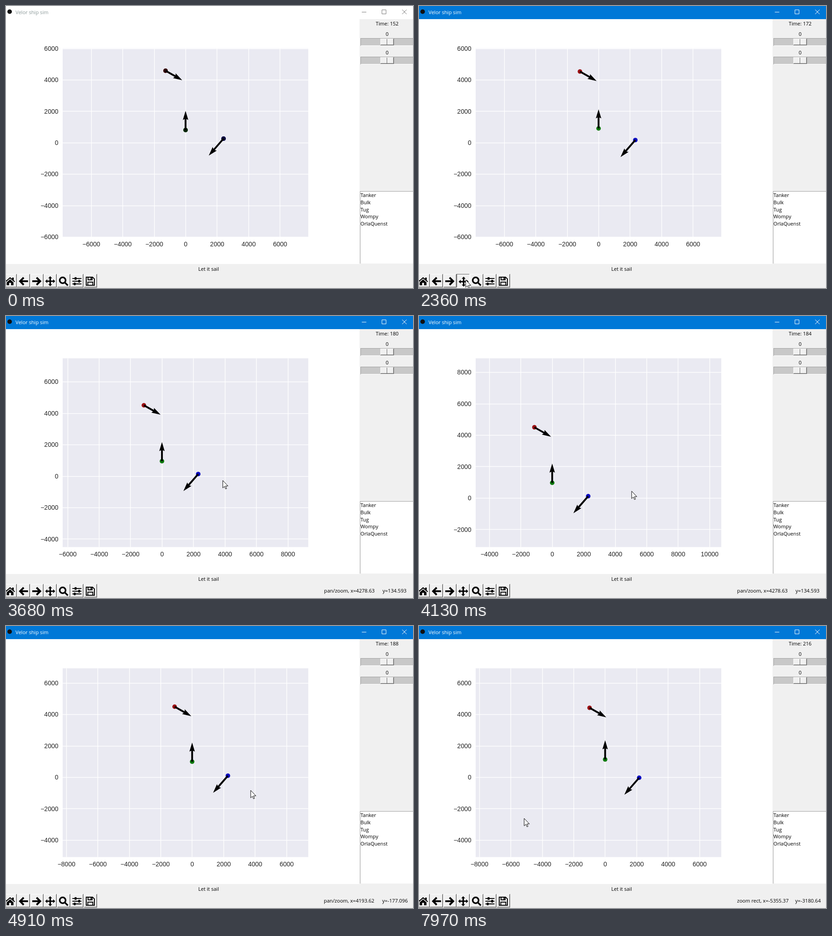
Animation of 898 by 623 pixels, one loop 8000 ms. Source, as an HTML page with a canvas:

```html
<!DOCTYPE html>
<html lang="en">
<head>
<meta charset="utf-8">
<title>Ship sim</title>
<style>
html, body { margin: 0; width: 100%; height: 100%; overflow: hidden; background: #f0f0f0; }
canvas { display: block; }
</style>
</head>
<body>
<canvas id="stage" width="898" height="623"></canvas>
<script>
const c = document.getElementById('stage').getContext('2d');
const LOOP = 8000;
const SCALE = 0.03471; // pixels per metre
const HOME = { x: 396.5, y: 302.3 }; // plot origin before panning
const AXES = { left: 125, top: 93.5, right: 667, bottom: 510.5 };
const UI_FONT = '11.1px "Open Sans", "Noto Sans", sans-serif';
const TICK_FONT = '14px "Liberation Sans", Arial, sans-serif';

const ACTIVATE = 2360, GRAB = 3260, DROP = 4620, ZOOM = 7480, CLICK = 75;
const LAG = 130; // the plot follows the pointer late

// Turning points of the pointer: [time, x, y]
const POINTER = [
  [580, 128, 623], [1340, 103, 605], [2600, 103, 605], [GRAB, 545, 295.6],
  [3390, 511, 332], [4000, 442.5, 397.8], [4130, 469, 387], [DROP, 559.5, 329.8],
  [4910, 540, 363], [5320, 505, 402], [6070, 505, 402], [6460, 166, 606],
  [6700, 148, 602], [7080, 126, 603], [7790, 126, 603], [7970, 232, 425]
];

// Toolbar message: [start, mode, x, y]
const GRABBED = { x: 4278.63, y: 134.593 };
const STATUS = [
  [0, ''], [ACTIVATE + CLICK, 'pan/zoom'],
  [3040, 'pan/zoom', GRABBED.x, GRABBED.y], [4780, 'pan/zoom', 4193.62, -177.096],
  [6200, 'pan/zoom', -595.041, -3719.01],
  [ZOOM, 'zoom rect'], [7900, 'zoom rect', -5355.37, -3180.64]
];

// Metres, metres per time unit, degrees
const START = 152;
const SHIPS = [
  { x: -1282, y: 4590, speed: 5.1, course: -29.6, color: '#9c1014' },
  { x: -9, y: 815, speed: 5.1, course: 90, color: '#0f7a0f' },
  { x: 2406, y: 268, speed: 6, course: -131, color: '#0808c0' }
];

const MOVE = new Path2D('M-11 0-6.5-4.3V-1.6H-1.6V-6.5H-4.3L0-11 4.3-6.5H1.6V-1.6H6.5V-4.3L11 0 6.5 4.3V1.6H1.6V6.5H4.3L0 11-4.3 6.5H-1.6V1.6H-6.5V4.3Z');
const ARROW = new Path2D('M0 0V16.5L3.8 13 6.2 18.7 8.6 17.7 6.2 12.2H11.5Z');

// Toolbar icons: path, stroke width (0 = fill), tooltip
const ICONS = [
  [new Path2D('M-11 0.5 0-9 4.5-5.2V-8H8V-2L11 .5 9.6 2 0-6-9.6 2ZM-7.5 2.5 0-4 7.5 2.5V9H2.2V3.5H-2.2V9H-7.5Z'), 0],
  [new Path2D('M10 0H-6M.5-8-7.5 0 .5 8'), 4],
  [new Path2D('M-10 0H6M-.5-8 7.5 0-.5 8'), 4],
  [MOVE, 0],
  [new Path2D('M4.5-2A6.5 6.5 0 1 1-8.5-2 6.5 6.5 0 1 1 4.5-2M3 3 9.5 9.5'), 3.5, 'Zoom to rectangle'],
  [new Path2D('M-10-7H10V-5H-10ZM-10-1H10V1H-10ZM-10 5H10V7H-10ZM-5-9H-1V-3H-5ZM3-3H7V3H3ZM-7 3H-3V9H-7Z'), 0, 'Configure subplots'],
  [new Path2D('M-9-9H5L9-5V9H-9ZM-5-9V-3H4V-9M1.5-8V-4M-5.5 9V2H5.5V9'), 2]
];
const BUTTON = 29.5;
const buttonLeft = i => Math.round(i * BUTTON - 5.5);

function pointerAt(t) {
  const next = POINTER.findIndex(k => k[0] > t);
  const b = POINTER.at(next), a = POINTER[Math.max(0, next < 0 ? POINTER.length - 1 : next - 1)];
  const p = a === b ? 0 : (t - a[0]) / (b[0] - a[0]);
  return { x: a[1] + (b[1] - a[1]) * p, y: a[2] + (b[2] - a[2]) * p };
}

// The grabbed point stays under the delayed pointer
function originAt(t) {
  if (t - LAG < GRAB) return HOME;
  const p = pointerAt(Math.min(t - LAG, DROP));
  return { x: p.x - GRABBED.x * SCALE, y: p.y + GRABBED.y * SCALE };
}

// Panning slows the simulation down
function ageAt(t) {
  const panning = Math.min(Math.max(t - GRAB, 0), DROP - GRAB);
  return 4 * Math.max(0, Math.floor((t - 0.2 * panning + 134) / 484));
}

function rect(x, y, w, h, color) {
  c.fillStyle = color;
  c.fillRect(x, y, w, h);
}

function text(str, x, y, align = 'left', color = '#000') {
  c.fillStyle = color;
  c.textAlign = align;
  c.fillText(str, x, y);
}

function disc(x, y, r, color) {
  c.fillStyle = color;
  c.beginPath();
  c.arc(x, y, r, 0, 7);
  c.fill();
}

function shape(path, x, y, fill, stroke, width = 1) {
  c.save();
  c.translate(x, y);
  if (fill) { c.fillStyle = fill; c.fill(path); }
  if (stroke) { c.strokeStyle = stroke; c.lineWidth = width; c.stroke(path); }
  c.restore();
}

function bevel(x, y, w, h, sunken) {
  const [light, dark] = sunken ? ['#696969', '#fff'] : ['#fff', '#696969'];
  rect(x, y, w, h, dark);
  rect(x, y, w - 1, h - 1, light);
  rect(x + 1, y + 1, w - 2, h - 2, sunken ? '#f0f0f0' : '#a0a0a0');
  rect(x + 1, y + 1, w - 3, h - 3, '#f0f0f0');
}

function titleBar(active) {
  rect(0, 0, 898, 29, active ? '#0078d7' : '#fff');
  disc(8, 12.5, 5, '#111');
  text('Velor ship sim', 21, 18, 'left', active ? '#fff' : '#8b9999');
  shape(new Path2D('M785 13.5H795M829.5 8.5H838.5V17.5H829.5ZM874 8 884 18M884 8 874 18'), 0, 0, null, active ? '#fff' : '#777');
}

function grid(origin) {
  const w = AXES.right - AXES.left, h = AXES.bottom - AXES.top;
  rect(0, 28, 780, 542, '#fff');
  rect(AXES.left, AXES.top, w, h, '#eaeaf2');
  c.font = TICK_FONT;
  for (let v = -10000; v <= 12000; v += 2000) {
    const x = origin.x + v * SCALE, y = origin.y - v * SCALE;
    const label = String(v).replace('-', '\u2212');
    if (x > AXES.left && x < AXES.right) {
      rect(Math.floor(x) - 0.2, AXES.top, 1.4, h, '#fff');
      text(label, x, 530.5, 'center', '#262626');
    }
    if (y > AXES.top - 0.5 && y < AXES.bottom + 0.5) {
      rect(AXES.left, Math.floor(y) - 0.2, w, 1.4, '#fff');
      text(label, 115.5, Math.round(y + 4.7), 'right', '#262626');
    }
  }
}

function ship(s, origin, age, active) {
  const angle = s.course * Math.PI / 180;
  const x = origin.x + (s.x + s.speed * age * Math.cos(angle)) * SCALE;
  const y = origin.y - (s.y + s.speed * age * Math.sin(angle)) * SCALE;
  const tip = s.speed * 8.3;
  disc(x, y, 5, s.color);
  if (!active) disc(x, y, 5, 'rgba(0,0,0,.7)');
  c.save();
  c.translate(x, y);
  c.rotate(-angle);
  const arrow = new Path2D(`M0-2H${tip - 18}L${tip - 20}-6 ${tip} 0 ${tip - 20} 6 ${tip - 18} 2H0Z`);
  shape(arrow, 0, 0, '#000');
  c.restore();
}

function slider(y) {
  text('0', 841, y - 5, 'center');
  rect(782, y, 116, 17, '#a0a0a0');
  rect(783, y + 1, 115, 16, '#fff');
  rect(783, y + 1, 115, 15, '#c8c8c8');
  bevel(826, y + 1, 30, 15);
  rect(840, y + 2, 1, 13, '#696969');
}

function sidePanel(clock) {
  text('Time: ' + clock, 841, 43, 'center');
  slider(71);
  slider(112);
  rect(781, 409, 117, 160, '#a0a0a0');
  rect(782, 410, 116, 159, '#fff');
  ['Tanker', 'Bulk', 'Tug', 'Wompy', 'OrlaQuenst'].forEach((name, i) => text(name, 782, 422 + i * 15.75));
}

function toolbar(t) {
  const during = start => t >= start && t < start + CLICK;
  const pressed = during(ACTIVATE) ? 3 : during(ZOOM) ? 4 : -1;
  text('Let it sail', 447, 584.5, 'center');
  ICONS.forEach(([path, width], i) => {
    const sunken = i === pressed, shift = sunken ? 1 : 0;
    bevel(buttonLeft(i), 592, 29, 30, sunken);
    shape(path, 9 + i * BUTTON + shift, 608 + shift, !width && '#000', width && '#000', width);
  });
  const [, mode, x, y] = STATUS.findLast(s => s[0] <= t);
  const pad = v => v.toPrecision(6).padEnd(12);
  text(x === undefined ? mode : `${mode}, x=${pad(x)} y=${pad(y)}`, 898, 611, 'right');
}

function tooltip(p) {
  const i = Math.floor((p.x + 5.5) / BUTTON);
  const label = p.y > 592 && ICONS[i]?.[2];
  if (!label) return;
  const x = buttonLeft(i) + 27, w = Math.round(c.measureText(label).width) + 6;
  rect(x, 593, w, 18, '#000');
  rect(x + 1, 594, w - 2, 16, '#ffffe0');
  text(label, x + 3, 606);
}

function draw() {
  const t = performance.now() % LOOP;
  const active = t >= ACTIVATE;
  const origin = originAt(t), age = ageAt(t), p = pointerAt(t);
  rect(0, 0, 898, 623, '#f0f0f0');
  grid(origin);
  SHIPS.forEach(s => ship(s, origin, age, active));
  c.font = UI_FONT;
  titleBar(active);
  sidePanel(START + age);
  toolbar(t);
  if (active) tooltip(p);
  if (t >= POINTER[0][0]) shape(t > 6400 && t < 7300 ? MOVE : ARROW, p.x, p.y, '#fff', '#000');
  requestAnimationFrame(draw);
}
draw();
</script>
</body>
</html>
```
